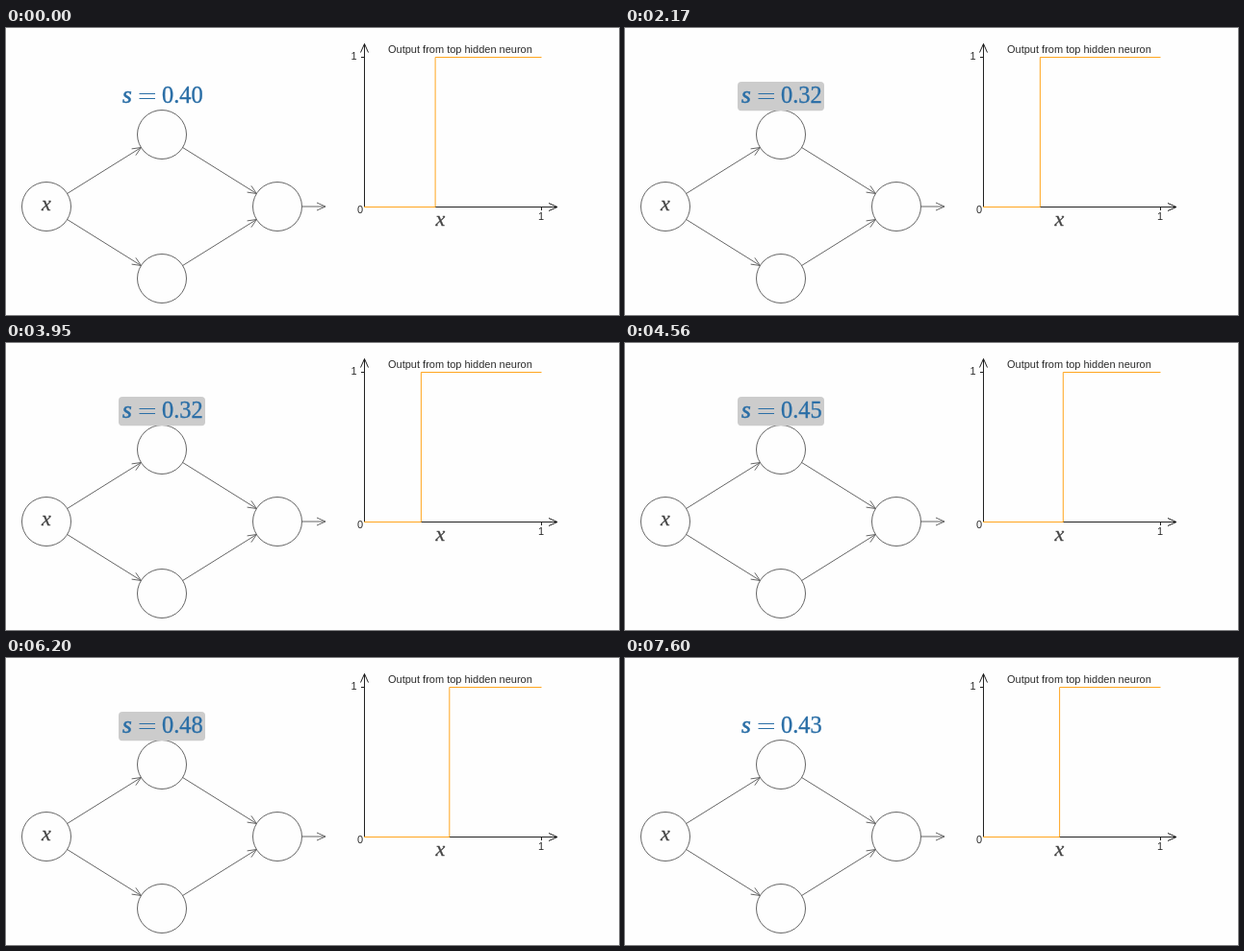
An HTML page for the animation above (8210 ms loop, 637 by 299 pixels).

```html
<!DOCTYPE html>
<html lang="en">
<head>
<meta charset="utf-8">
<title>Step position of a hidden neuron</title>
<style>
  html, body { margin: 0; width: 100%; height: 100%; overflow: hidden; background: #fefefe; }
  svg { display: block; }
  text { font: 11px "Liberation Sans", Arial, sans-serif; fill: #2a2a2a; }
  .math { font: 24.4px "Liberation Serif", Times, serif; }
  .var { font-size: 22px; font-style: italic; fill: #444; stroke: #444; stroke-width: .3; }
  .blue { fill: #2a6ea6; stroke: #2a6ea6; stroke-width: .35; }
  .line { fill: none; stroke: #666; }
  .axis { fill: none; stroke: #222; }
  #step { fill: none; stroke: #ffa51f; }
</style>
</head>
<body>
<svg width="637" height="299" viewBox="0 0 637 299">
  <g id="network"></g>
  <text class="math var" x="37" y="190">x</text>

  <rect id="box" x="117" y="56" width="90" height="30.3" rx="4"/>
  <text class="math var blue" x="121" y="78" style="font-size:25px;stroke-width:.6">s</text>
  <path class="blue" d="M138.5 68.5h16.5M138.5 73.5h16.5" style="stroke-width:1.2"/>
  <text class="math blue" id="value" x="162" y="78"></text>

  <g id="axes"></g>
  <path class="axis" d="M369 30.5h3M556.5 187v3"/>
  <text x="397" y="26">Output from top hidden neuron</text>
  <text x="358.5" y="33">1</text>
  <text x="365" y="193">0</text>
  <text x="553" y="200">1</text>
  <text class="math var" x="446.5" y="206">x</text>
  <path id="step"/>
</svg>
<script>
const $ = id => document.getElementById(id);
const LOOP = 8210, R = 25.5;

function arrow(x1, y1, x2, y2, kind) {
  const a = Math.atan2(y2 - y1, x2 - x1), c = Math.cos(a), s = Math.sin(a);
  const barb = side => `${x2 - 9 * c - side * s} ${y2 - 9 * s + side * c}`;
  return `<path class="${kind}" d="M${x1} ${y1}L${x2} ${y2}M${barb(-4)}L${x2} ${y2}L${barb(4)}"/>`;
}

const circle = ([x, y]) => `<circle class="line" cx="${x}" cy="${y}" r="${R}"/>`;

// Arrow between the rims of two nodes
function link([x1, y1], [x2, y2]) {
  const d = Math.hypot(x2 - x1, y2 - y1);
  const dx = (x2 - x1) / d * R, dy = (y2 - y1) / d * R;
  return arrow(x1 + dx, y1 + dy, x2 - dx, y2 - dy, "line");
}

const input = [42, 186], output = [282, 186], hidden = [[162, 111], [162, 261]];
$("network").innerHTML =
  [input, output, ...hidden].map(circle).join("") +
  hidden.map(node => link(input, node) + link(node, output)).join("") +
  arrow(307.5, 186, 332, 186, "line");
$("axes").innerHTML =
  arrow(372.5, 187, 372.5, 16.5, "axis") + arrow(372, 186.5, 573, 186.5, "axis");

// Drag path: time in ms and s in hundredths; whole steps in between
const path = [
  [0, 40], [1250, 39], [1480, 38], [3010, 24], [3600, 24], [4410, 43],
  [4780, 48], [4880, 48], [5580, 55], [5960, 55], [6200, 48], [6510, 44],
  [7220, 43], [LOOP, 43]
];

function stepAt(t) {
  const i = path.findIndex(([time]) => time > t);
  const [t0, from] = path[i - 1], [t1, to] = path[i];
  return (from + Math.trunc((to - from) * (t - t0) / (t1 - t0))) / 100;
}

function boxFill(t) {
  if (t < 300 || t >= 7600) return "none";
  return t >= 1080 && t < 7520 ? "#ccc" : "#e6e6e6";
}

function draw(t) {
  const s = stepAt(t);
  $("box").style.fill = boxFill(t);
  $("value").textContent = s.toFixed(2);
  $("step").setAttribute("d", `M372 186.5H${372.5 + 184 * s}V30.5H556.5`);
}

const begin = performance.now();
function frame() {
  draw((performance.now() - begin) % LOOP);
  requestAnimationFrame(frame);
}
frame();
</script>
</body>
</html>
```
